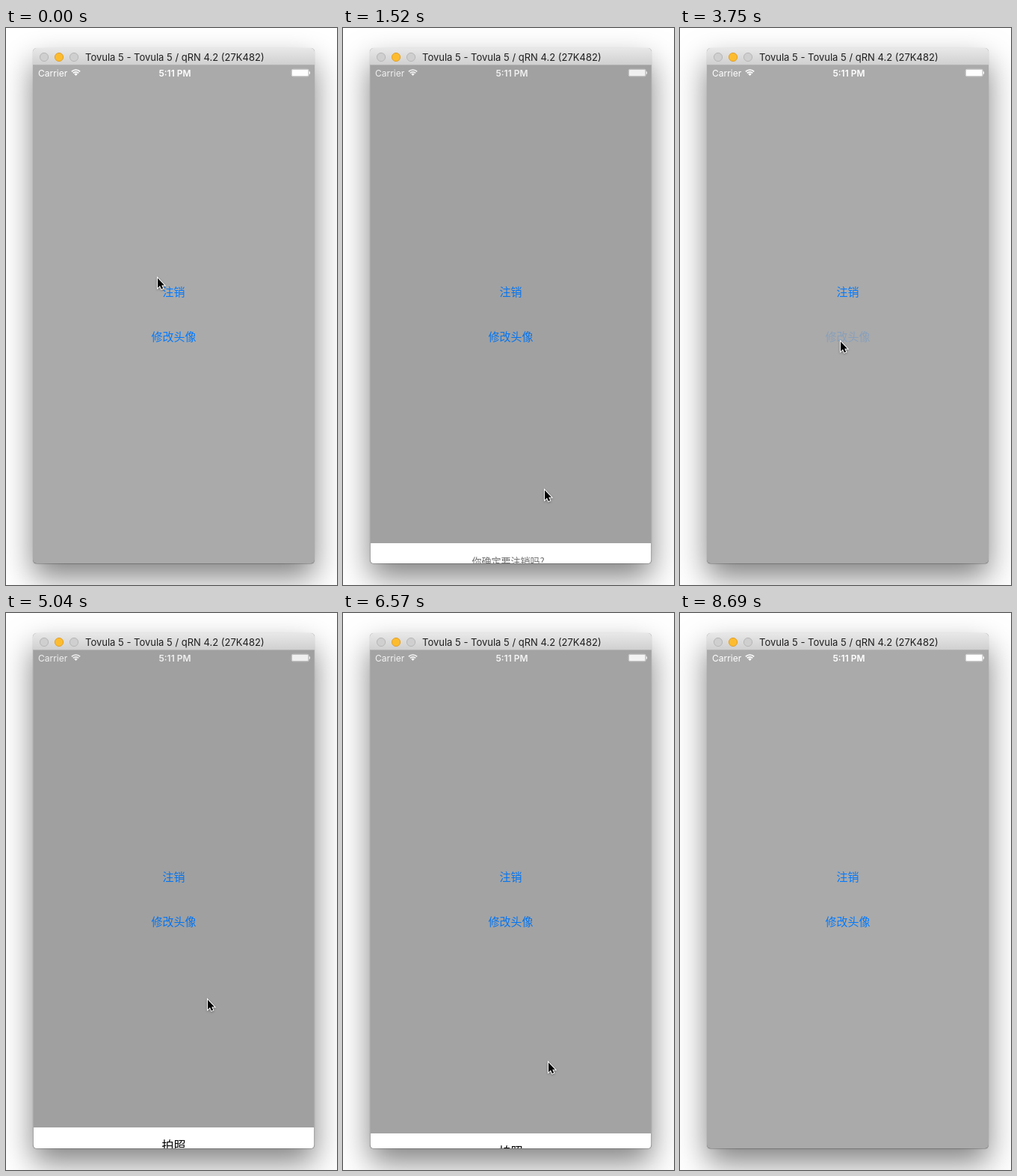
An HTML page with a canvas for the animation above (9.14 s loop, 443 by 746 pixels).

```html
<!DOCTYPE html>
<html lang="zh-CN">
<head>
<meta charset="utf-8">
<title>Action sheet</title>
<style>
html, body { margin: 0; width: 100%; height: 100%; overflow: hidden; background: #fff; }
canvas { display: block; width: 443px; height: 746px; }
</style>
</head>
<body>
<canvas id="stage" width="443" height="746"></canvas>
<script>
const ctx = document.getElementById('stage').getContext('2d');
const LOOP = 9140, STEP = 117.3, LAST_STEP = 74;
const WIN = { x: 36, y: 27, w: 377, h: 690 };
const SCREEN = { x: 37, y: 50, w: 375, h: 667 };
const BOTTOM = SCREEN.y + SCREEN.h, MID = SCREEN.x + SCREEN.w / 2;
const ROW = 49, GAP = 5, SHEET_H = ROW * 3 + GAP, SLIDE = 300;
const PRESS_LEAD = 300, RELEASE_LEAD = 40, FADE = 200;
const CJK = '"Noto Sans CJK SC", "Noto Sans CJK", sans-serif';
const LATIN = 'Inter, sans-serif';
const BUTTONS = ['注销', '修改头像'];
const ARROW = new Path2D('M0 0V13L3 10.3L5 14.7L7.2 13.7L5.2 9.4H9Z');
const buttonY = i => 354 + i * 60;

// Each visit opens the sheet from a button; the pointer travels to rest and waits for hide
const visits = [
  { button: 0, show: 450, hide: 1352, travel: 850, rest: { x: 269, y: 617 } },
  { button: 0, show: 2114, hide: 2900, travel: 230, rest: { x: 319, y: 550 } },
  { button: 1, show: 4000, hide: 4873, travel: 690, rest: { x: 269, y: 516 } },
  { button: 1, show: 5760, hide: 6378, travel: 600, rest: { x: 274, y: 600 } },
  { button: 1, show: 7270, hide: 8330, travel: 1000, rest: { x: 320, y: 552 } }
];

const clamp = v => Math.max(0, Math.min(1, v));
const easeOut = u => 1 - (1 - clamp(u)) ** 2;
const smooth = u => u * u * (3 - 2 * u);
const mix = (a, b, u) => a + (b - a) * u;

function pointerAt(t) {
  let from = { x: 202, y: 333 }, leave = 0;
  for (const { button, show, hide, travel, rest } of visits) {
    const aim = { x: 214, y: buttonY(button) + 4 };
    const move = (a, b, u) => ({ x: mix(a.x, b.x, smooth(clamp(u))), y: mix(a.y, b.y, smooth(clamp(u))) });
    if (t < show) return move(from, aim, (t - leave) / (show - PRESS_LEAD - leave));
    if (t < hide + SLIDE) return move(aim, rest, (t - show) / travel);
    from = rest;
    leave = hide + SLIDE;
  }
  return from;
}

function sheetAt(t) {
  const visit = visits.find(v => t >= v.show && t < v.hide + SLIDE);
  if (!visit) return null;
  const open = easeOut((t - visit.show) / SLIDE) - easeOut((t - visit.hide) / SLIDE);
  return { open, kind: visit.button };
}

function buttonAlpha(index, t) {
  const visit = visits.find(v => v.button === index && t >= v.show - PRESS_LEAD && t < v.show + FADE);
  return visit ? mix(0.2, 1, clamp((t - visit.show + RELEASE_LEAD) / FADE)) : 1;
}

function fillRect(x, y, w, h, color) {
  ctx.fillStyle = color;
  ctx.fillRect(x, y, w, h);
}

function roundPath(x, y, w, h, r) {
  ctx.beginPath();
  ctx.roundRect(x, y, w, h, r);
}

function text(str, x, y, font, color, align = 'left') {
  ctx.font = font;
  ctx.fillStyle = color;
  ctx.textAlign = align;
  ctx.fillText(str, x, y);
}

// Centres Chinese text vertically on cy
function label(str, cy, size, color, x = MID, align = 'center') {
  text(str, x, Math.round(cy + size * 0.33), `${size}px ${CJK}`, color, align);
}

function drawShadow(blur, offset, alpha) {
  ctx.save();
  ctx.shadowColor = `rgba(0,0,0,${alpha})`;
  ctx.shadowBlur = blur;
  ctx.shadowOffsetY = offset;
  ctx.fillStyle = '#aaa';
  roundPath(WIN.x, WIN.y, WIN.w, WIN.h, 5);
  ctx.fill();
  ctx.restore();
}

function drawWindow() {
  fillRect(0, 0, 443, 746, '#fff');
  drawShadow(40, 19, 0.49);
  drawShadow(1, 0.6, 0.4);

  const bar = ctx.createLinearGradient(0, 27, 0, 49);
  bar.addColorStop(0, '#e8e8e8');
  bar.addColorStop(1, '#d0d0d0');
  ctx.fillStyle = bar;
  roundPath(WIN.x, WIN.y, WIN.w, 23, [5, 5, 0, 0]);
  ctx.fill();
  fillRect(WIN.x, 49, WIN.w, 1, '#b4b4b4');

  for (let i = 0; i < 3; i++) {
    const active = i === 1;
    ctx.beginPath();
    ctx.arc(51 + i * 20, 39, 5.6, 0, Math.PI * 2);
    ctx.fillStyle = active ? '#fdbc2f' : '#cfcfcf';
    ctx.fill();
    ctx.strokeStyle = active ? '#e0a02c' : '#b6b6b6';
    ctx.lineWidth = 1;
    ctx.stroke();
  }
  text('Tovula 5 - Tovula 5 / qRN 4.2 (27K482)', 106, 44, `13px ${LATIN}`, '#1e1e1e');
}

function drawWifi(x, y) {
  const from = -Math.PI * 0.75, to = -Math.PI * 0.25;
  ctx.strokeStyle = ctx.fillStyle = '#fff';
  ctx.lineWidth = 1.7;
  for (const r of [8, 5.2]) {
    ctx.beginPath();
    ctx.arc(x, y, r, from, to);
    ctx.stroke();
  }
  ctx.beginPath();
  ctx.moveTo(x, y);
  ctx.arc(x, y, 3.2, from, to);
  ctx.fill();
}

function drawBattery(x, y) {
  ctx.strokeStyle = ctx.fillStyle = '#fff';
  ctx.lineWidth = 0.5;
  roundPath(x + 0.25, y + 0.25, 23, 9.5, 2);
  ctx.stroke();
  roundPath(x + 1, y + 1, 21.5, 8, 1);
  ctx.fill();
  ctx.fillRect(x + 23.8, y + 3.4, 1.2, 3.2);
}

function drawStatusBar() {
  text('Carrier', 43, 64.5, `12px ${LATIN}`, '#fff');
  drawWifi(93.5, 64);
  text('5:11 PM', 226, 64.5, `600 12px ${LATIN}`, '#fff', 'center');
  drawBattery(382, 55);
}

function drawButtons(t) {
  BUTTONS.forEach((name, i) => {
    ctx.globalAlpha = buttonAlpha(i, t);
    label(name, buttonY(i), 15, '#007aff');
  });
  ctx.globalAlpha = 1;
}

function drawSheet({ open, kind }) {
  const top = Math.round(BOTTOM - SHEET_H * open);
  const rowY = i => top + ROW * (i + 0.5);
  fillRect(SCREEN.x, SCREEN.y, SCREEN.w, SCREEN.h, `rgba(46,49,50,${0.4 * open})`);
  fillRect(SCREEN.x, top, SCREEN.w, SHEET_H, '#fff');
  if (kind === 0) {
    label('你确定要注销吗?', rowY(0), 13, '#6f6f6f', 172.5, 'left');
    label('确定', rowY(1), 16, '#ff0a0a');
  } else {
    label('拍照', rowY(0), 16, '#000');
    label('从相册选择', rowY(1), 16, '#000');
  }
  fillRect(SCREEN.x, top + ROW, SCREEN.w, 1, '#dedfe0');
  fillRect(SCREEN.x, top + ROW * 2, SCREEN.w, GAP, '#e9e9ee');
  label('取消', rowY(2) + GAP, 16, '#000');
}

function drawPointer({ x, y }) {
  ctx.save();
  ctx.translate(Math.round(x) + 1, Math.round(y) + 2);
  ctx.shadowColor = 'rgba(0,0,0,0.35)';
  ctx.shadowBlur = 3;
  ctx.shadowOffsetY = 1;
  ctx.lineWidth = 2;
  ctx.strokeStyle = '#fff';
  ctx.stroke(ARROW);
  ctx.shadowColor = 'transparent';
  ctx.fillStyle = '#000';
  ctx.fill(ARROW);
  ctx.restore();
}

function draw(step) {
  const t = step * STEP, sheet = sheetAt(t);
  drawWindow();
  ctx.save();
  roundPath(SCREEN.x, SCREEN.y, SCREEN.w, SCREEN.h, [0, 0, 4, 4]);
  ctx.clip();
  drawStatusBar();
  drawButtons(t);
  if (sheet) drawSheet(sheet);
  ctx.restore();
  if (step < LAST_STEP) drawPointer(pointerAt(t));
}

let shown = -1;
const start = performance.now();
function tick() {
  const t = (performance.now() - start) % LOOP;
  const step = Math.min(LAST_STEP, Math.floor((t + 8) / STEP));
  if (step !== shown) draw(shown = step);
  requestAnimationFrame(tick);
}
tick();
</script>
</body>
</html>
```
